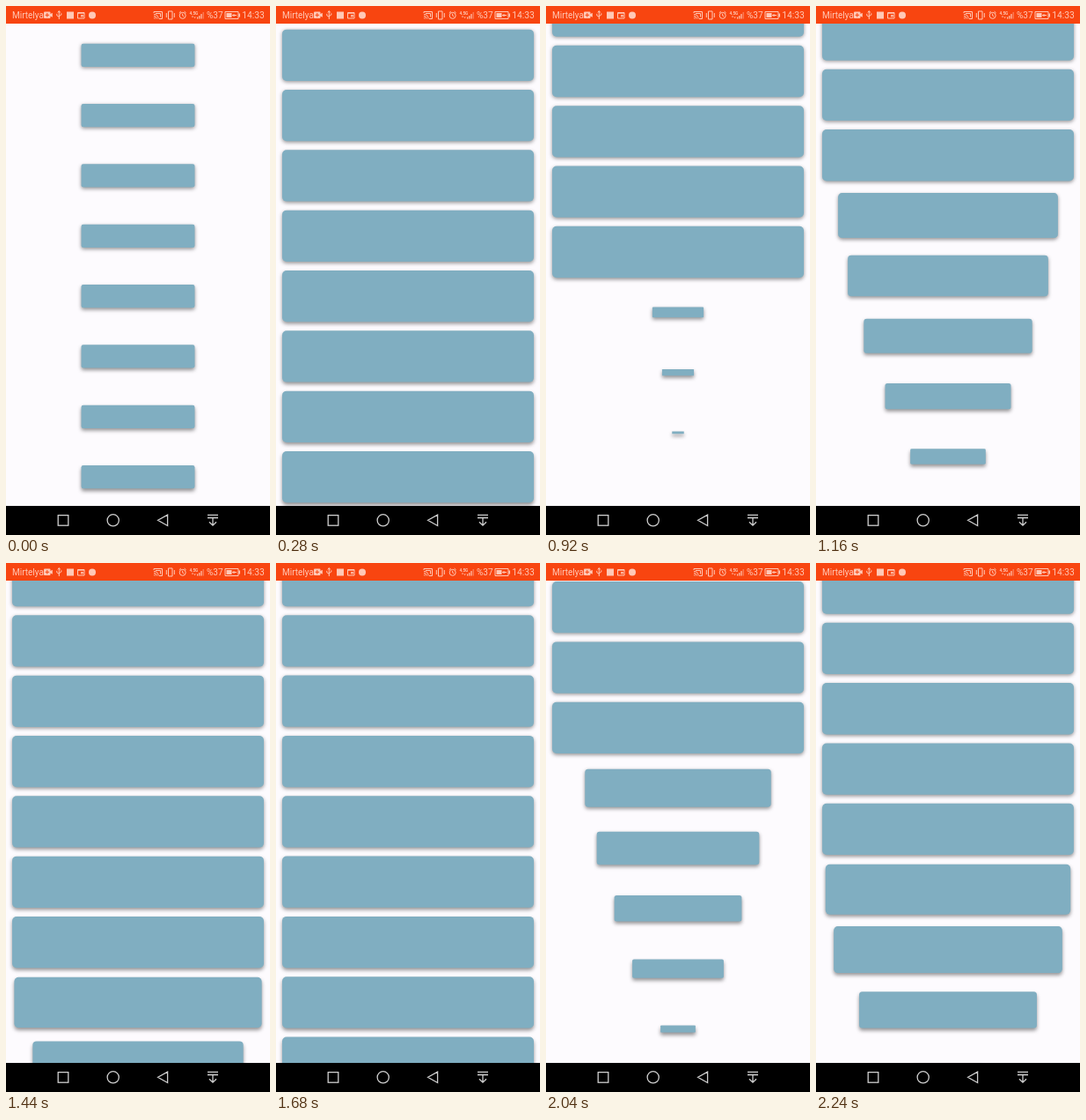
These frames come from a looping animation (300x600 px, 2280 ms). An HTML page with a canvas:

```html
<!DOCTYPE html>
<html lang="en">
<head>
<meta charset="utf-8">
<title>Cards growing into a scrolling list</title>
<style>
  html, body { margin: 0; width: 300px; height: 600px; overflow: hidden; background: #fdfbfe; }
  canvas, svg { position: absolute; left: 0; top: 0; display: block; }
  text { font: 10px Roboto, Arial, sans-serif; }
</style>
</head>
<body>
<canvas id="list" width="300" height="600"></canvas>
<svg width="300" height="600" viewBox="0 0 300 600">
  <rect width="300" height="20" fill="#f84510"/>
  <rect y="567" width="300" height="33"/>

  <g fill="#ffc8b6">
    <text x="7" y="14">Mirtelya</text>
    <text x="228" y="14">%37</text>
    <text x="268.3" y="14" style="font-size:10.2px">14:33</text>
    <text x="208.5" y="9.5" style="font-size:4.6px;font-weight:700">4.5G</text>
    <!-- recorder -->
    <path d="M44 6.5h5.5q1 0 1 1v1.6l2.3-1.3v5l-2.3-1.3v1.5q0 1-1 1h-5.5q-1 0-1-1v-5.500q0-1 1-1z"/>
    <path d="M46.8 8v4.500M44.600 10.250h4.500" stroke="#f84510"/>
    <!-- app badges -->
    <rect x="69" y="6.500" width="8" height="8"/>
    <circle cx="98" cy="10.500" r="4"/>
    <!-- signal -->
    <path d="M217 12.500h1.200v2h-1.200zM219.200 11h1.200v3.500h-1.200zM221.400 9h1.200v5.500h-1.200z"/>
    <path d="M223.600 7h1.200v7.500h-1.200z" opacity=".5"/>
    <path d="M212 11l1.200 1.500h-2.400zM214.600 14l1.200-1.500h-2.400z"/>
    <!-- battery -->
    <rect x="250.500" y="8" width="6" height="5"/>
    <rect x="264.500" y="8.500" width="1.500" height="4"/>
  </g>
  <g fill="none" stroke="#ffc8b6">
    <!-- usb -->
    <path d="M60.300 6v9M58.800 7.500l1.500-2 1.500 2M57.800 8.800v2l2.500 1.500M62.800 8.300v1.700l-2.500 1.700"/>
    <!-- window -->
    <path d="M81.500 7.500h7.500v6.500h-7.500zM81.500 8.200h7.500M85.500 10.500h2v1.500h-2z"/>
    <!-- cast -->
    <path d="M168 8v-1.500h9.500v8h-3.500M168 9.500q5 0 5 5M168 11.500q3 0 3 3M168 13.500q1 0 1 1M170 8.500h5.500v4"/>
    <!-- vibrate -->
    <path d="M184.500 6h4.500v9h-4.500zM182.300 8v5M191.300 8v5"/>
    <!-- alarm -->
    <circle cx="200.700" cy="10.800" r="3.500"/>
    <path d="M200.700 8.700v2.300l1.500 1M196.800 7.800l2-1.700M204.600 7.800l-2-1.700"/>
    <path d="M249 6.500h15v8h-15zM257 10.500h5M259 9v3"/>
  </g>

  <g fill="none" stroke="#cfcfcf" stroke-width="1.300">
    <rect x="59.200" y="577.600" width="11.600" height="11.600"/>
    <circle cx="121.700" cy="583.300" r="6.600"/>
    <path d="M172.600 583.300l11-6.200v12.400zM229 577.400h12M229 580.500h12M235 580.500v8.500M231 585.200l4 4 4-4"/>
  </g>
</svg>
<script>
const ctx = document.getElementById('list').getContext('2d');
const LOOP = 2280, STEP = 40, GROW = 510, GLIDE = 869;
const WIDTH = 286, HEIGHT = 58.3, PITCH = 68.33, FIRST = 55.8;
const VISIBLE_AT_START = 8;

// Times at which the later cards enter and begin to grow
const entries = [768, 802, 849, 905, 972, 1065, 1704, 1737, 1783, 1830, 1916, 2060];

const clamp = v => Math.min(1, Math.max(0, v));
const ease = p => (1 - Math.cos(Math.PI * clamp(p))) / 2;
const fling = age => 1 - (1 - clamp(age / GLIDE)) ** 5.5;
const scrollAt = t => 377.4 * fling(t - 759) + 403 * fling(t - 1688);

function drawCard(y, scale) {
  const w = WIDTH * scale, h = HEIGHT * scale;
  ctx.shadowOffsetY = 1 + 2 * y / 567;
  ctx.beginPath();
  ctx.roundRect(150 - w / 2, y - h / 2, w, h, 5 * scale);
  ctx.fill();
}

function draw(t) {
  ctx.shadowColor = 'transparent';
  ctx.fillStyle = '#fdfbfe';
  ctx.fillRect(0, 0, 300, 600);
  ctx.fillStyle = '#80aec1';
  ctx.shadowColor = 'rgba(0,0,0,.42)';
  ctx.shadowBlur = 4;
  const scroll = scrollAt(t);
  for (let i = 0; i < VISIBLE_AT_START + entries.length; i++) {
    const start = i < VISIBLE_AT_START ? -239 : entries[i - VISIBLE_AT_START];
    const y = FIRST + i * PITCH - scroll;
    const scale = ease((t - start) / GROW);
    if (scale > 0.004 && y > -40 && y < 640) drawCard(y, scale);
  }
}

const begin = performance.now();
function tick() {
  const t = (performance.now() - begin) % LOOP;
  draw(Math.floor(t / STEP) * STEP);
  requestAnimationFrame(tick);
}
tick();
</script>
</body>
</html>
```
